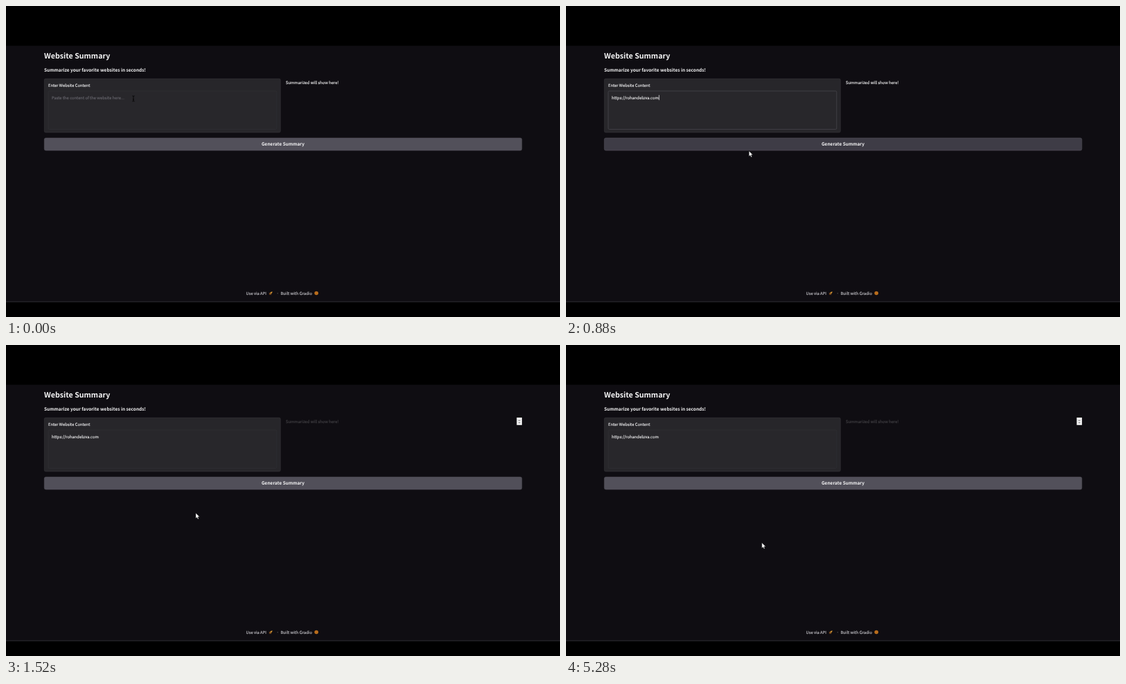
Write an HTML page that moves like this. It is 800 px wide and 450 px high and loops after 8000 ms.

```html
<!DOCTYPE html>
<html lang="en">
<head>
<meta charset="utf-8">
<title>Website Summary</title>
<style>
  html, body { margin: 0; width: 100%; height: 100%; overflow: hidden; background: #000; }
  svg { display: block; width: 100%; height: 100%; }
  text {
    font-family: "Noto Sans CJK SC", "Noto Sans CJK JP", "Noto Sans CJK", "Open Sans", sans-serif;
    font-size: 5.82px; fill: #f4f4f5; stroke: #f4f4f5; stroke-width: .14px;
    text-rendering: geometricPrecision; white-space: pre;
  }
  .title { font-size: 10.66px; font-weight: 600; stroke: none; }
  .strong { font-size: 6.54px; font-weight: 600; stroke: none; }
  .foot { fill: #c6c5ca; stroke: #c6c5ca; }
  .hint { fill: #68676e; stroke: #68676e; }
</style>
</head>
<body>
<svg viewBox="0 0 800 450">
  <rect width="800" height="450" fill="#000"/>
  <rect y="57.5" width="800" height="370" fill="#0f0d12"/>
  <rect y="427.3" width="800" height="1.2" fill="#2b2a2f"/>

  <text class="title" x="55" y="76.2">Website Summary</text>
  <text class="strong" x="55" y="95.2">Summarize your favorite websites in seconds!</text>

  <rect x="55.3" y="105.3" width="341" height="77.6" rx="1.8" fill="#27262a" stroke="#38373c" stroke-width=".6"/>
  <text x="61" y="116.8">Enter Website Content</text>
  <rect id="field" x="61" y="123" width="329.8" height="55.4" rx="1.4" fill="#28272b" stroke-width=".7"/>
  <text id="hint" class="hint" x="66" y="134.7">Paste the content of the website here...</text>
  <text id="url" x="66" y="134.7">https://rohandeluva.com</text>
  <rect id="caret" x="133.9" y="128.8" width=".7" height="7.4" fill="#f4f4f5"/>

  <text id="result" x="404" y="112.5">Summarized will show here!</text>
  <g id="loader">
    <rect x="737.5" y="105" width="7.6" height="10.8" fill="#f1f1f1"/>
    <path d="M739.6 109.2h3.2M740 112.4h2.6" stroke="#55545a" stroke-width=".8"/>
  </g>

  <rect id="button" x="55.3" y="191" width="689.6" height="18" rx="2.2" stroke="#54525c" stroke-width=".6"/>
  <text class="strong" x="400" y="202.4" text-anchor="middle">Generate Summary</text>

  <text class="foot" x="346.5" y="417.8">Use via API</text>
  <g transform="translate(382.3 415.6) rotate(45)">
    <path d="M0-3.4Q1.5-1.8 1.1 1H-1.1Q-1.5-1.8 0-3.4Z" fill="#d99a35"/>
    <path d="M-1.1-.2L-2.1 1.7H2.1L1.1-.2Z" fill="#8a5520"/>
    <path d="M-.7 1.7H.7L0 3.2Z" fill="#c96f1e"/>
  </g>
  <circle cx="392.2" cy="415.8" r=".5" fill="#8d8c92"/>
  <text class="foot" x="396.5" y="417.8">Built with Gradio</text>
  <circle cx="448.2" cy="415.5" r="2.8" fill="#b86c1c"/>

  <g id="pointer">
    <path id="beam" d="M-1.6-4Q0-4 0-3.1Q0-4 1.6-4M0-3.2V3.2M-1.6 4Q0 4 0 3.1Q0 4 1.6 4M-.9 1.2H.9"
      fill="none" stroke="#050505" stroke-width=".9"/>
    <path id="arrow" d="M0 0V8L1.8 6.4 3 9.1 4.4 8.5 3.2 5.8H5.7Z"
      fill="#fff" stroke="#09090b" stroke-width=".5"/>
    <path id="hand" d="M-.9.6Q-.9-.4 0-.4T.9.6V3.1L3.6 3.7Q4.6 4 4.5 5L4 7.6Q3.8 9.2 3.2 9.5H0Q-.9 8.9-1.3 7.8L-2.8 5.5Q-2.6 4.5-1.6 5L-.9 5.7Z"
      fill="#fff" stroke="#09090b" stroke-width=".5"/>
  </g>
</svg>
<script>
  const LOOP = 8000, FOCUS = 200, PASTE = 360, CLICK = 1320;
  const $ = id => document.getElementById(id);

  // Rows are [time, ...values]
  const path = [
    [0, 184, 134], [220, 184, 134], [600, 235.5, 194], [660, 235.5, 194],
    [880, 264.2, 209.7], [1000, 266, 209.6], [1160, 266.3, 205.7],
    [1340, 266.3, 205.7], [1720, 282.8, 286]
  ];
  const hover = [[660, 0], [820, 1], [900, 1], [1030, .45], [1160, .72], [1280, 1], [1360, 1], [1540, 0]];

  const ease = u => u * u * (3 - 2 * u);
  const mix = (a, b, u) => a + (b - a) * u;

  function at(keys, t) {
    const i = keys.findIndex(k => k[0] > t);
    if (i < 0) return keys[keys.length - 1].slice(1);
    if (i === 0) return keys[0].slice(1);
    const a = keys[i - 1], b = keys[i], u = ease((t - a[0]) / (b[0] - a[0]));
    return a.slice(1).map((v, n) => mix(v, b[n + 1], u));
  }

  const show = (id, on) => $(id).setAttribute("visibility", on ? "visible" : "hidden");

  function draw(t) {
    const [x, y] = at(path, t), [h] = at(hover, t);
    const loading = t >= CLICK, focused = t >= FOCUS && !loading;
    const cursor = t < 700 ? "beam" : y > 191 && y < 209 ? "hand" : "arrow";

    $("pointer").setAttribute("transform", `translate(${x} ${y})`);
    for (const id of ["beam", "arrow", "hand"]) show(id, id === cursor);

    const tone = [[82, 62], [80, 60], [90, 70]].map(([a, b]) => Math.round(mix(a, b, h)));
    $("button").setAttribute("fill", `rgb(${tone})`);
    $("field").setAttribute("stroke", focused ? "#4c4b51" : "#323136");

    show("hint", t < PASTE);
    show("url", t >= PASTE);
    show("caret", t >= PASTE + 20 && t < 920);
    show("loader", loading);
    $("result").setAttribute("opacity", loading ? .22 : 1);
  }

  const start = performance.now();
  function tick() {
    draw((performance.now() - start) % LOOP);
    requestAnimationFrame(tick);
  }
  draw(0);
  requestAnimationFrame(tick);
</script>
</body>
</html>
```
